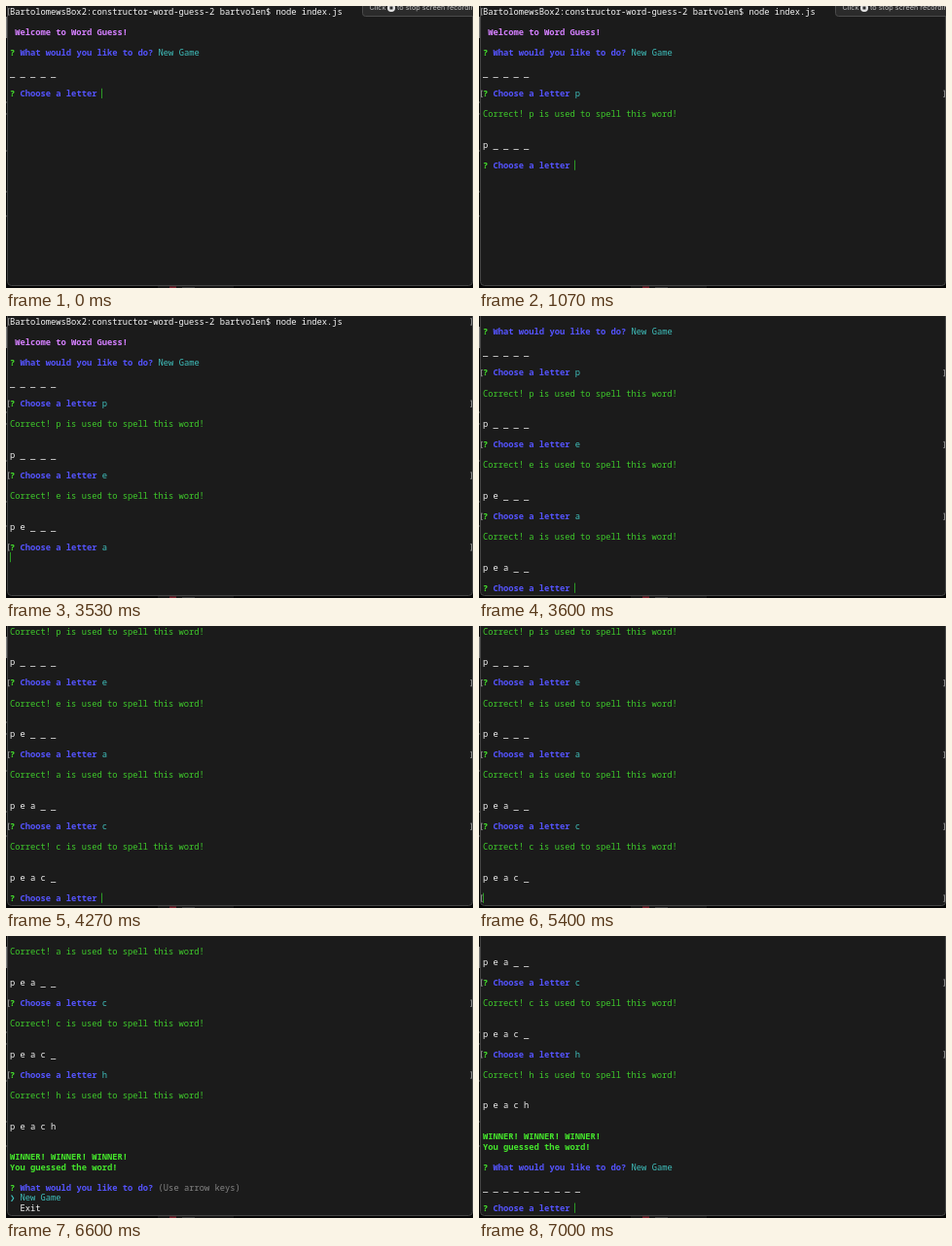
Animation of 480 by 290 pixels, one loop 7470 ms. Source, as an HTML page with a canvas:

```html
<!DOCTYPE html>
<html lang="en">
<head>
<meta charset="utf-8">
<title>Word Guess</title>
<style>
html, body { margin: 0; width: 100%; height: 100%; overflow: hidden; background: #000; }
canvas { display: block; width: 480px; height: 290px; }
</style>
</head>
<body>
<canvas id="stage"></canvas>
<script>
const W = 480, H = 290, LOOP = 7470;
const LEFT = 4, TOP = 0.4, COL = 5.262, ROW = 10.545, LAST_ROW = 26;
const FONT = '8.77px "Noto Sans Mono", "DejaVu Sans Mono", monospace';
const WHITE = '#f6f6f6', GREEN = '#3fcb2b', LIME = '#45e62c', BLUE = '#5554ff',
      CYAN = '#3fc0bd', PINK = '#d580ff', GRAY = '#858585';

const WORD = 'peach';
// type: key pressed, blank: prompt cleared, enter: answer echoed, out: reply printed
const GUESSES = [
  { type: 600, blank: 1000, enter: 1000, out: 1070 },
  { type: 2270, blank: 2600, enter: 2600, out: 2600 },
  { type: 2870, blank: 3470, enter: 3530, out: 3600 },
  { type: 3870, blank: 4270, enter: 4270, out: 4270 },
  { type: 5000, blank: 5400, enter: 5470, out: 5530 }
];
const RESTART = 6670, FADE_START = 1930, FADE_STEP = 67, FADE_STEPS = 5;

const canvas = document.getElementById('stage');
const ctx = canvas.getContext('2d');
const dpr = window.devicePixelRatio || 1;
canvas.width = W * dpr;
canvas.height = H * dpr;

const seg = (text, color, bold = false) => ({ text, color, bold });
const ask = text => [seg('? ', LIME, true), seg(text + ' ', BLUE, true)];
const blanks = n => Array(n).fill('_').join(' ');
const revealed = n => [...WORD].map((c, i) => i < n ? c : '_').join(' ');

function terminalAt(t) {
  const lines = [], marks = [];
  let cursor = null;
  const print = (...segs) => lines.push(segs);
  const gap = (n = 1) => { while (n--) lines.push([]); };
  const cursorAt = col => { cursor = { row: lines.length - 1, col }; };
  const finish = () => ({ lines, marks, cursor });

  marks.push(0);
  print(seg('BartolomewsBox2:constructor-word-guess-2 bartvolen$ node index.js', WHITE));
  gap();
  print(seg(' Welcome to Word Guess!', PINK, true));
  gap();
  print(...ask('What would you like to do?'), seg('New Game', CYAN));
  gap();
  print(seg(blanks(WORD.length), WHITE));
  gap();

  for (let i = 0; i < GUESSES.length; i++) {
    const g = GUESSES[i], letter = WORD[i];
    if (t < g.blank) {
      const typed = t >= g.type ? letter : '';
      print(...ask('Choose a letter'), seg(typed, WHITE));
      cursorAt(18 + typed.length);
      return finish();
    }
    marks.push(lines.length);
    if (t < g.enter) {
      gap();
      cursorAt(0);
      return finish();
    }
    print(...ask('Choose a letter'), seg(letter, CYAN));
    gap();
    if (t < g.out) {
      cursorAt(0);
      return finish();
    }
    print(seg(`Correct! ${letter} is used to spell this word!`, GREEN));
    gap(2);
    print(seg(revealed(i + 1), WHITE));
    gap();
  }

  gap();
  print(seg('WINNER! WINNER! WINNER!', LIME, true));
  print(seg('You guessed the word!', LIME, true));
  gap();
  const menu = ask('What would you like to do?');
  if (t < RESTART) {
    print(...menu, seg('(Use arrow keys)', GRAY));
    print(seg('❯ New Game', CYAN));
    print(seg('  Exit', WHITE));
  } else {
    print(...menu, seg('New Game', CYAN));
    gap();
    print(seg(blanks(10), WHITE));
    gap();
    print(...ask('Choose a letter'));
    cursorAt(18);
  }
  return finish();
}

function rect(x, y, w, h, color) {
  ctx.fillStyle = color;
  ctx.fillRect(x, y, w, h);
}

function drawWindow() {
  rect(0, 0, W, H, '#050505');
  rect(0, 11, 1, 22, '#777');
  for (const y of [98, 110, 148, 190, 215]) rect(0, y, 1, 2, '#3a3a3a');
  rect(156, 288, 78, 2, '#161616');
  rect(168, 288.5, 7, 1.5, '#7a2430');
  rect(181, 289, 13, 1, '#3c3c3c');
  ctx.beginPath();
  ctx.roundRect(1.5, -10, 478, 297.5, 4);
  ctx.fillStyle = '#1b1b1b';
  ctx.fill();
  ctx.strokeStyle = '#444';
  ctx.lineWidth = 1;
  ctx.stroke();
}

function drawMark(y) {
  const top = y + 2, color = '#858585';
  for (const [bar, lip] of [[2, 2], [478, 477]]) {
    rect(bar, top, 1, 7, color);
    rect(lip, top, 2, 0.7, color);
    rect(lip, top + 6.3, 2, 0.7, color);
  }
}

function drawTerminal({ lines, marks, cursor }) {
  const scroll = Math.max(0, lines.length - 1 - LAST_ROW, cursor ? cursor.row - LAST_ROW : 0);
  const rowTop = row => TOP + (row - scroll) * ROW;
  for (const row of marks) if (row >= scroll) drawMark(rowTop(row));
  ctx.textBaseline = 'alphabetic';
  lines.forEach((segs, row) => {
    if (row < scroll) return;
    let col = 0;
    for (const s of segs) {
      ctx.font = (s.bold ? '700 ' : '500 ') + FONT;
      ctx.fillStyle = s.color;
      ctx.fillText(s.text, LEFT + col * COL, rowTop(row) + 8.3);
      col += s.text.length;
    }
  });
  if (cursor) rect(Math.round(LEFT + cursor.col * COL - 0.4), rowTop(cursor.row), 1, ROW - 0.3, '#2c9a25');
}

function drawNotice(t) {
  const step = t < FADE_START ? 0 : Math.floor((t - FADE_START) / FADE_STEP) + 1;
  if (step >= FADE_STEPS) return;
  ctx.save();
  ctx.globalAlpha = 1 - step / FADE_STEPS;
  ctx.beginPath();
  ctx.roundRect(366.5, -8, 120, 18.5, 3);
  ctx.fillStyle = '#2b2b2b';
  ctx.fill();
  ctx.strokeStyle = '#4b4b4b';
  ctx.stroke();
  ctx.font = '7.3px Inter, sans-serif';
  ctx.fillStyle = '#bdbdbd';
  ctx.fillText('Click', 373.5, 4.4);
  ctx.fillText('to stop screen recording', 402, 4.4);
  ctx.beginPath();
  ctx.arc(396, 2, 4, 0, Math.PI * 2);
  ctx.fillStyle = '#e4e4e4';
  ctx.fill();
  rect(394.5, 0.5, 3, 3, '#2b2b2b');
  ctx.restore();
}

const start = performance.now();
function frame() {
  const t = (performance.now() - start) % LOOP;
  ctx.setTransform(dpr, 0, 0, dpr, 0, 0);
  drawWindow();
  drawTerminal(terminalAt(t));
  drawNotice(t);
  requestAnimationFrame(frame);
}
frame();
</script>
</body>
</html>
```
